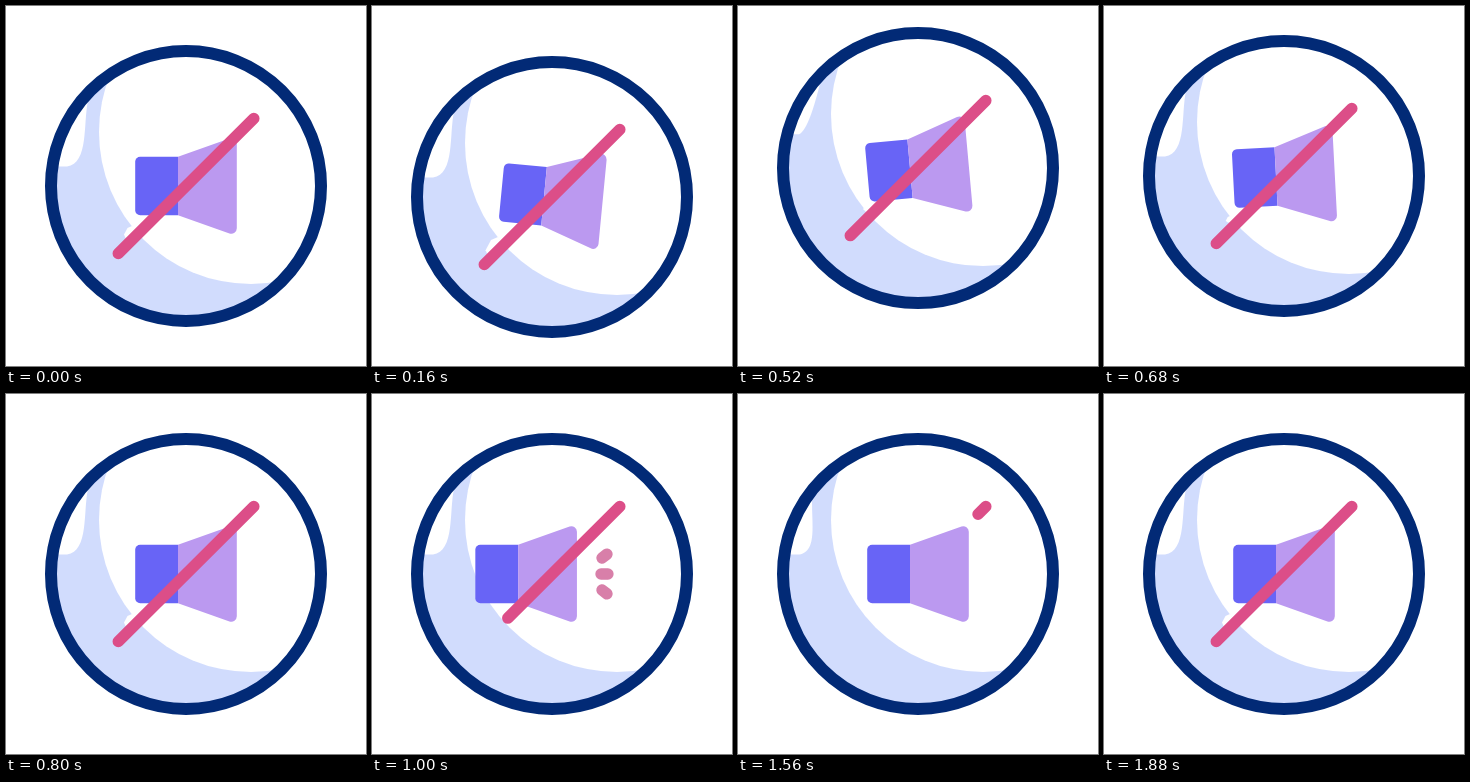
Animation, 360 px wide and 360 px high, one loop 2 s. Source, as an HTML page with a canvas:

```html
<!DOCTYPE html>
<html>
<head>
<meta charset="utf-8">
<style>
html, body { margin: 0; width: 100%; height: 100%; overflow: hidden; background: #fff; }
canvas { display: block; width: 360px; height: 360px; }
</style>
</head>
<body>
<canvas id="stage" width="360" height="360"></canvas>
<script>
const ctx = document.getElementById('stage').getContext('2d');
const LOOP = 2000, STEP = 40, MID = 180, RADIUS = 141, RIM = 12;
const NAVY = '#022a76', PALE = '#d1dcfd', BODY = '#6864f6', CONE = '#bb99f0', PINK = '#dc4e88';

// Smooth 0..1 between times a and b
function ease(t, a, b) {
  const p = Math.min(1, Math.max(0, (t - a) / (b - a)));
  return (1 - Math.cos(Math.PI * p)) / 2;
}

// One swing: out to +down, across to -up, back to rest
function swing(t, down, up) {
  return down * ease(t, 40, 280) - (down + up) * ease(t, 280, 560) + up * ease(t, 560, 800);
}

function disc(x, y, r, color) {
  ctx.fillStyle = color;
  ctx.beginPath();
  ctx.arc(x, y, r, 0, Math.PI * 2);
  ctx.fill();
}

function line(x, y, dx, dy, from, to, width, color) {
  ctx.strokeStyle = color;
  ctx.lineWidth = width;
  ctx.lineCap = 'round';
  ctx.beginPath();
  ctx.moveTo(x + dx * from, y + dy * from);
  ctx.lineTo(x + dx * to, y + dy * to);
  ctx.stroke();
}

// Block with square near corners and rounded far corners
function block(nearX, nearY, farX, farY, r, color) {
  ctx.fillStyle = color;
  ctx.beginPath();
  ctx.moveTo(nearX, -nearY);
  ctx.arcTo(farX, -farY, farX, farY, r);
  ctx.arcTo(farX, farY, nearX, nearY, r);
  ctx.lineTo(nearX, nearY);
  ctx.fill();
}

function drawGlint(t, lift) {
  const top = 82 - 7 * (ease(t, 1000, 1280) - ease(t, 1520, 1800));
  const dip = 1.8 * Math.max(0, -lift - 10);
  const low = 160.5 - dip;
  ctx.fillStyle = '#fff';
  ctx.beginPath();
  ctx.moveTo(30, 95);
  ctx.lineTo(top, 95);
  ctx.bezierCurveTo(top - 5, 117, 83 - dip, low - 3, 61, low);
  ctx.lineTo(30, low);
  ctx.fill();
}

// White corner beside the slash
function drawNotch(size) {
  ctx.beginPath();
  ctx.moveTo(126, 220);
  ctx.lineTo(126 - 9 * size, 220 + 4 * size);
  ctx.lineTo(126 - 16 * size, 220 + 17 * size);
  ctx.lineTo(126 - 13 * size, 220 + 24 * size);
  ctx.lineTo(133, 229);
  ctx.fill();
}

function drawBubble(t, lift, slash) {
  ctx.save();
  ctx.beginPath();
  ctx.arc(MID, MID, RADIUS - RIM / 2, 0, Math.PI * 2);
  ctx.clip();
  disc(MID, MID, RADIUS, PALE);
  disc(245, 126, 152, '#fff');
  drawGlint(t, lift);
  if (slash > 0.9) drawNotch(Math.max(0, 0.5 + lift / 40));
  ctx.restore();

  ctx.strokeStyle = NAVY;
  ctx.lineWidth = RIM;
  ctx.beginPath();
  ctx.arc(MID, MID, RADIUS - RIM / 2, 0, Math.PI * 2);
  ctx.stroke();
}

function drawSpeaker(t) {
  const shift = 26.4 * (ease(t, 1220, 1480) - ease(t, 800, 1020));
  ctx.save();
  ctx.translate(MID + shift, MID);
  ctx.rotate(swing(t, 11, 6) * Math.PI / 180);
  block(-8, 29.3, -50.8, 29.3, 5, BODY);
  block(-8, 29.3, 50.8, 50, 5.5, CONE);
  ctx.restore();
}

function drawWaves(t) {
  const width = 11.4 * (ease(t, 900, 1000) - ease(t, 1280, 1420));
  if (width < 0.1) return;
  const head = ease(t, 900, 1160), tail = ease(t, 1060, 1320);
  const mix = ease(t, 1000, 1200);
  const color = `rgb(${216 + 22 * mix}, ${127 + 71 * mix}, ${169 - 73 * mix})`;
  for (const side of [-1, 0, 1]) {
    const slant = Math.abs(side);
    line(229 + slant, MID + 16 * side, 21.5 - 6 * slant, 12 * side, tail, head, width, color);
  }
}

function draw(now) {
  const t = Math.floor((now % LOOP) / STEP) * STEP;
  const lift = swing(t, 22, 20);
  const slash = 1 - ease(t, 936, 1170) + ease(t, 1520, 1780);
  ctx.fillStyle = '#fff';
  ctx.fillRect(0, 0, 360, 360);
  ctx.save();
  ctx.translate(0, lift);
  drawBubble(t, lift, slash);
  drawSpeaker(t);
  drawWaves(t);
  if (slash > 0.005) line(247.8, 112.5, -135.5, 135, 0, slash, 11.5, PINK);
  ctx.restore();
}

const start = performance.now();
function tick() {
  draw(performance.now() - start);
  requestAnimationFrame(tick);
}
tick();
</script>
</body>
</html>
```
